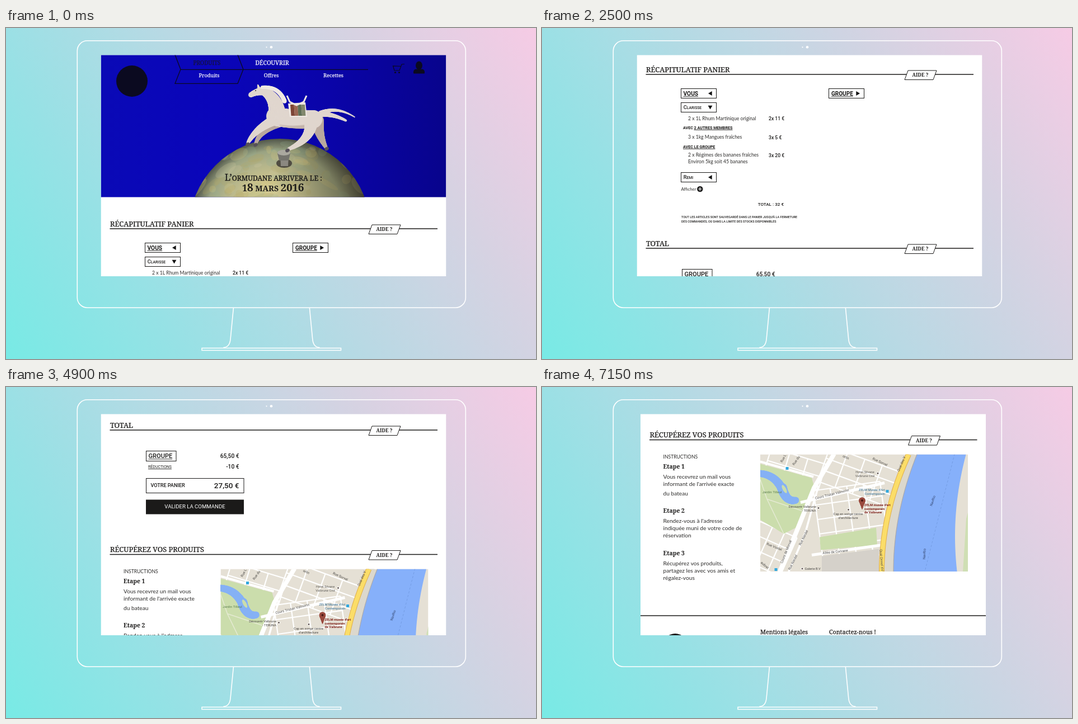
Recreate the animation shown at these times as an HTML page with a canvas. Size 947x592 px, loop 9150 ms.

```html
<!DOCTYPE html>
<html lang="fr">
<head>
<meta charset="utf-8">
<title>Panier</title>
<style>
html, body { margin: 0; width: 100%; height: 100%; overflow: hidden; }
canvas { display: block; width: 947px; height: 592px; }
</style>
</head>
<body>
<canvas id="stage"></canvas>
<script>
const W = 947, H = 592, LOOP = 9150, TICK = 50;
const canvas = document.getElementById('stage');
const ctx = canvas.getContext('2d');
const dpr = window.devicePixelRatio || 1;
canvas.width = W * dpr;
canvas.height = H * dpr;

const INK = '#1b1a19', NAVY = '#0b0a20';
const SERIF = '"Noto Serif", serif';
const LIGHT = 'Lato, sans-serif';
const LABEL = 'Roboto, sans-serif';
const LEFT = 169.5, WIDE = 617;

// Each scroll runs in equal hard steps.
const SCROLLS = [
  { start: 2000, steps: 11, dy: 276, dx: 0 },
  { start: 4500, steps: 9, dy: 317, dx: 0 },
  { start: 6900, steps: 6, dy: 205, dx: 6.5 }
];

function pose(t) {
  let x = 0, y = 0;
  for (const s of SCROLLS) {
    const n = Math.floor((t - s.start) / TICK) + 1;
    const part = Math.min(Math.max(n, 0), s.steps) / s.steps;
    x += s.dx * part;
    y += s.dy * part;
  }
  return { x, y: Math.round(y) };
}

function seeded(seed) {
  return () => (seed = (seed * 16807) % 2147483647) / 2147483647;
}

// Text is placed by the middle of its capitals.
function text(str, x, y, size, o = {}) {
  ctx.save();
  ctx.translate(x, y);
  ctx.rotate((o.turn || 0) * Math.PI / 180);
  ctx.font = `${o.weight || 400} ${size}px ${o.font || LABEL}`;
  ctx.textAlign = o.align || 'left';
  ctx.fillStyle = ctx.strokeStyle = o.color || INK;
  const base = size * 0.356;
  ctx.fillText(str, 0, base);
  if (o.thick) {
    ctx.lineWidth = o.thick;
    ctx.strokeText(str, 0, base);
  }
  if (o.under) ctx.fillRect(0, base + 1.2, ctx.measureText(str).width, 0.9);
  ctx.restore();
}

const serif = (s, x, y, size, o) => text(s, x, y, size, { font: SERIF, thick: 0.25, ...o });
const light = (s, x, y, size, o) => text(s, x, y, size, { font: LIGHT, color: '#2e2d2c', ...o });
const bold = (s, x, y, size, o) => text(s, x, y, size, { weight: 700, ...o });
const medium = (s, x, y, size, o) => text(s, x, y, size, { weight: 500, ...o });

// Runs of different sizes on one baseline.
function runs(parts, x, base, font, weight, thick = 0) {
  ctx.fillStyle = ctx.strokeStyle = INK;
  ctx.textAlign = 'left';
  ctx.lineWidth = thick;
  for (const [str, size] of parts) {
    ctx.font = `${weight} ${size}px ${font}`;
    ctx.fillText(str, x, base);
    if (thick) ctx.strokeText(str, x, base);
    x += ctx.measureText(str).width;
  }
}

function trace(p, closed) {
  ctx.beginPath();
  for (let i = 0; i < p.length; i += 2) ctx.lineTo(p[i], p[i + 1]);
  if (closed) ctx.closePath();
}

function poly(p, fill, stroke) {
  trace(p, true);
  ctx.fillStyle = fill;
  ctx.fill();
  if (!stroke) return;
  ctx.strokeStyle = stroke;
  ctx.lineWidth = 1;
  ctx.stroke();
}

function line(p, color, width = 1) {
  trace(p, false);
  ctx.strokeStyle = color;
  ctx.lineWidth = width;
  ctx.stroke();
}

function oval(x, y, rx, ry, fill, turn = 0) {
  ctx.beginPath();
  ctx.ellipse(x, y, rx, ry, turn, 0, Math.PI * 2);
  ctx.fillStyle = fill;
  ctx.fill();
}

const disc = (x, y, r, fill) => oval(x, y, r, r, fill);

// Tapered stroke along a quadratic curve.
function limb([x0, y0], [cx, cy], [x1, y1], r0, r1, fill) {
  for (let t = 0; t <= 1; t += 1 / 48) {
    const u = 1 - t, a = u * u, b = 2 * u * t, c = t * t;
    disc(a * x0 + b * cx + c * x1, a * y0 + b * cy + c * y1, r0 + (r1 - r0) * t, fill);
  }
}

function box(x, y, w, h, color = INK, width = 1) {
  ctx.strokeStyle = color;
  ctx.lineWidth = width;
  ctx.strokeRect(x, y, w, h);
}

function clipTo(x, y, w, h) {
  ctx.beginPath();
  ctx.rect(x, y, w, h);
  ctx.clip();
}

// Colour stops sit at even distances.
function blend(g, colors) {
  colors.forEach((c, i) => g.addColorStop(i / (colors.length - 1), c));
  return g;
}

function backdrop() {
  ctx.fillStyle = blend(ctx.createLinearGradient(0, H, W, 0),
    ['#78eae5', '#97e1e5', '#b9d9e4', '#d7d2e2', '#f6cbe5']);
  ctx.fillRect(0, 0, W, H);
}

function monitor() {
  ctx.strokeStyle = '#fff';
  ctx.lineWidth = 1.6;
  ctx.beginPath();
  ctx.roundRect(127.3, 22.8, 694, 477.4, 18);
  for (const side of [-1, 1]) {
    const at = dx => 474.4 + side * dx;
    ctx.moveTo(at(68), 501);
    ctx.lineTo(at(73.3), 556);
    ctx.quadraticCurveTo(at(74.5), 571, at(86), 571.5);
  }
  ctx.stroke();
  disc(465.5, 34.3, 1.1, '#fff');
  disc(474, 34.3, 2.3, '#fff');
  box(350, 572.5, 248.5, 4, '#fff', 1.5);
}

function globe() {
  const rnd = seeded(29), tints = ['#d9c77c', '#93ad94', '#cfc9a0', '#b0a662'];
  ctx.save();
  ctx.beginPath();
  ctx.arc(489, 360, 162, 0, Math.PI * 2);
  ctx.clip();
  ctx.fillStyle = blend(ctx.createRadialGradient(460, 300, 10, 489, 360, 164),
    ['#d0c88f', '#c6c08c', '#b3b48b', '#9aa382', '#4a4f45']);
  ctx.fillRect(320, 190, 340, 120);
  ctx.globalAlpha = 0.22;
  for (let i = 0; i < 90; i++) {
    const x = 345 + rnd() * 290, y = 205 + rnd() * 100;
    oval(x, y, 4 + rnd() * 18, 3 + rnd() * 7, tints[i % 4], (x - 489) / 160);
  }
  ctx.fillStyle = blend(ctx.createLinearGradient(480, 0, 650, 0), ['rgba(60,50,20,0)', '#332a18']);
  ctx.globalAlpha = 0.55;
  ctx.fillRect(480, 190, 170, 120);
  ctx.restore();
}

function knob() {
  oval(497, 242, 14, 8, '#504d42');
  poly([490, 228, 505, 228, 504, 247, 491, 247], '#8b8880');
  poly([485, 224, 508, 224, 505, 237, 488, 237], '#74736d');
  oval(496.5, 223, 11.5, 5, '#aaa89f');
}

function horse() {
  const coat = '#e0d6ce', shade = '#b9a89e', pale = '#efe8e2';
  limb([487, 170], [453, 184], [446, 207], 8, 2.6, shade);
  limb([556, 166], [559, 192], [572, 214], 12, 2.8, shade);
  limb([562, 152], [592, 139], [624, 160], 4, 1, coat);
  limb([562, 154], [586, 154], [608, 166], 5, 2, coat);
  limb([482, 158], [515, 165], [551, 163], 17, 16, coat);
  limb([490, 174], [520, 181], [550, 174], 2, 5, 'rgba(150,125,110,.08)');
  limb([545, 168], [545, 200], [504, 217], 12, 2.8, coat);
  limb([477, 166], [444, 182], [432, 206], 9, 2.8, coat);
  limb([484, 150], [482, 126], [463, 114], 15, 8, coat);
  limb([460, 113], [448, 113], [437, 120], 7.5, 4.3, coat);
  limb([452, 108], [451, 105], [450, 102], 2.2, 1, coat);
  limb([458, 106], [488, 104], [498, 132], 3, 4, pale);
  disc(446, 112, 1, '#3a3030');
  for (const [x, y] of [[432, 208], [446, 209], [503, 219], [573, 216]]) oval(x, y, 4, 3, '#565059', -0.5);
  poly([504, 135, 535, 133, 538, 159, 507, 159], pale);
  for (let i = 0; i < 4; i++) {
    const x = 508 + i * 6.5;
    poly([x, 137, x + 6.5, 137, x + 8, 157, x + 1.5, 157], ['#7d4536', '#9a6652', '#5f6f55', '#81876c'][i]);
  }
  line([502, 121, 507, 132, 519, 138, 532, 132, 537, 121], pale, 3);
}

function icons() {
  line([712, 64.5, 707, 65, 703, 76, 694, 76, 691.5, 68, 706, 68.5], NAVY, 1.2);
  disc(695.5, 79.5, 1.6, NAVY);
  disc(702.5, 79.5, 1.6, NAVY);
  oval(738, 67, 6, 7.5, NAVY);
  ctx.beginPath();
  ctx.roundRect(728, 73.5, 20, 8, [5, 5, 1, 1]);
  ctx.fill();
}

function hero() {
  ctx.save();
  clipTo(LEFT, 40, WIDE, 262.5);
  ctx.fillStyle = blend(ctx.createLinearGradient(170, 0, 787, 0), ['#0a09b6', '#0a05ba', '#0a04a8', '#08048c']);
  ctx.fillRect(LEFT, 40, WIDE, 263);
  globe();
  knob();
  horse();
  ctx.restore();
  disc(225, 95, 28, NAVY);
  line([302, 48, 312, 74, 302, 99.3, 414, 99.3, 424, 74, 414, 48], NAVY, 1.3);
  line([312, 74.3, 647, 74.3], NAVY, 1.3);
  icons();
  serif('PRODUITS', 359, 62, 9.9, { align: 'center', color: '#15133a' });
  serif('DÉCOUVRIR', 475.5, 62, 10.4, { align: 'center', color: '#fff' });
  ['Produits', 'Offres', 'Recettes'].forEach((s, i) =>
    serif(s, 363 + i * 111, 85, 9.2, { align: 'center', color: '#f4f2fa' }));
  runs([['L’', 16], ['ORMUDANE ARRIVERA LE :', 12.2]], 391, 273, SERIF, 400, 0.4);
  runs([['1', 16], ['8', 19], [' MARS ', 14], ['201', 18.5], ['6', 19]], 422, 292, SERIF, 700);
}

function section(title, y) {
  line([185.5, y, 771, y], INK, 1.5);
  serif(title, 186, y - 9, 12.8);
  poly([654, y - 7, 705, y - 7, 699, y + 9.5, 648, y + 9.5], '#fff', INK);
  serif('AIDE ?', 676, y + 1.2, 8.5, { align: 'center', weight: 700, thick: 0 });
}

const DOWN = 90, BACK = 180, NEXT = 0;

function chooser(x, y, turn) {
  box(x, y - 8.5, 63, 17);
  ctx.save();
  ctx.translate(x + 52, y);
  ctx.rotate(turn * Math.PI / 180);
  poly([3.5, 0, -3.2, -3.9, -3.2, 3.9], '#111');
  ctx.restore();
}

function member(name, y, turn) {
  chooser(248.5, y, turn);
  runs([[name[0], 9.2], [name.slice(1).toUpperCase(), 6.8]], 252.7, y + 3, LABEL, 500);
}

function item(name, price, y) {
  light(name, 261, y, 8.65);
  medium(price, 405, y + 0.6, 8.6);
}

function basket() {
  section('RÉCAPITULATIF PANIER', 359);
  chooser(248.5, 393, BACK);
  bold('VOUS', 252.5, 393, 10.2, { under: true });
  chooser(512.5, 393, NEXT);
  bold('GROUPE', 517, 393, 10, { under: true });
  member('Clarisse', 418, DOWN);
  item('2 x 1L Rhum Martinique original', '2x 11 €', 437.8);
  bold('AVEC', 252, 454, 7.2);
  bold('2 AUTRES MEMBRES', 271.5, 454, 7.2, { under: true });
  item('3 x 1kg Mangues fraîches', '3x 5 €', 471);
  bold('AVEC LE GROUPE', 252, 488, 7.2, { under: true });
  item('2 x Régimes des bananes fraîches', '3x 20 €', 503.3);
  item('Environ 5kg soit 45 bananes', '', 515.3);
  member('Remi', 543, BACK);
  light('Afficher', 248.5, 564.5, 7.8);
  disc(282.3, 564, 5.3, '#222');
  line([279.3, 564, 285.3, 564], '#fff', 1.2);
  line([282.3, 561, 282.3, 567], '#fff', 1.2);
  line([252, 581.5, 433, 581.5]);
  medium('TOTAL : 32 €', 432, 591, 8.1, { align: 'right' });
  medium("TOUT LES ARTICLES SONT SAUVEGARDÉ DANS LE PANIER JUSQU'À LA FERMETURE", 249, 614, 5.45);
  medium('DES COMMANDES, OÙ DANS LA LIMITE DES STOCKS DISPONNIBLES', 249, 622, 5.45);
}

function totals() {
  const end = { align: 'right' };
  section('TOTAL', 670);
  box(250.5, 707.5, 53.5, 18);
  medium('GROUPE', 254.5, 716.3, 11.1, { under: true });
  medium('65,50 €', 416.5, 716, 10.2, end);
  text('RÉDUCTIONS', 254, 735.5, 7, { under: true });
  medium('-10 €', 416.5, 735, 10.2, end);
  box(250.5, 756.5, 174.5, 26);
  medium('VOTRE PANIER', 258.5, 769, 9.1);
  medium('27,50 €', 416.5, 769, 13.5, end);
  ctx.fillStyle = INK;
  ctx.fillRect(250, 794.5, 175, 26);
  text('VALIDER LA COMMANDE', 337.5, 806.7, 9.6, { align: 'center', color: '#fff' });
}

// An empty line is a small paragraph gap.
const STEPS = [
  ['Vous recevrez un mail vous', "informant de l'arrivée exacte", '', 'du bateau'],
  ["Rendez-vous à l'adresse", 'indiquée muni de votre code de', 'réservation'],
  ['Récupérez vos produits,', 'partagez les avec vos amis et', 'régalez-vous']
];

function pickup() {
  section('RÉCUPÉREZ VOS PRODUITS', 892.5);
  light('INSTRUCTIONS', 210, 923, 8.6);
  let y = 940;
  STEPS.forEach((lines, i) => {
    serif('Etape ' + (i + 1), 210, y, 10.4, { weight: 700, thick: 0 });
    y += 18;
    for (const s of lines) {
      light(s, 210, y, 10.2);
      y += s ? 13 : 4;
    }
    y += 18.5;
  });
  ctx.save();
  ctx.translate(383.5, 918.5);
  map();
  ctx.restore();
}

const MAP_W = 371, MAP_H = 209.5;

// Samples a map edge given as x over the height above the bottom, 0 to 1.
function edge(fn) {
  const p = [];
  for (let u = -0.05; u <= 1.05; u += 0.05) p.push(fn(u), MAP_H * (1 - u));
  return p;
}

const quay = u => 217 + 48 * u * u;
const bank = u => 238 + 42 * u * u;
const farBank = u => 348 + 40 * (u - 0.3) ** 2;
const ferry = u => 294 + 53 * u;

function streets(x, y, turn, cols, rows, dx, dy) {
  ctx.save();
  ctx.translate(x, y);
  ctx.rotate(turn * Math.PI / 180);
  for (let i = 0; i <= cols; i++) line([i * dx, 0, i * dx, rows * dy], '#fff', 2.2);
  for (let j = 0; j <= rows; j++) line([0, j * dy, cols * dx, j * dy], '#fff', 2.2);
  ctx.restore();
}

function land() {
  ctx.fillStyle = '#e5e0d5';
  ctx.fillRect(0, 0, MAP_W, MAP_H);
  streets(95, 65, -8, 4, 6, 30, 26);
  streets(125, -14, 20, 4, 3, 33, 22);
  streets(0, 120, 24, 3, 4, 24, 25);
  streets(20, -12, 17, 3, 2, 34, 24);
  poly([0, 17, 92, 42, 96, 57, 66, 130, 42, 142, 0, 117], '#cbddac');
  poly([106, 148, 207, 131, 209, 162, 108, 171], '#cbddac');
  poly([110, 182, 212, 169, 213, 212, 110, 212], '#d5d1ca');
  line([0, 45, 12, 80, 42, 142], '#e5ead3', 1.5);
  line([12, 80, 78, 102], '#e5ead3', 1.5);
  limb([-2, 34], [26, 36], [39, 62], 6, 8, '#85b1f5');
  limb([39, 60], [46, 86], [64, 82], 9, 6, '#85b1f5');
  oval(43, 62, 3, 8, '#cbddac', -0.5);
  line([0, 13, 95, 40], '#fff', 4);
  line([72, 86, 222, 51], '#fff', 5);
  line([92, 180, 218, 162], '#fff', 5);
  line([132, -1, 96, 60, 66, 135, 34, 212], '#fff', 8);
  line([104, 56, 80, 142, 50, 212], '#fff', 3.5);
}

function river() {
  const shore = edge(bank);
  const right = edge(farBank);
  const water = [...shore];
  for (let i = right.length - 2; i >= 0; i -= 2) water.push(right[i], right[i + 1]);
  line(edge(u => (quay(u) + bank(u)) / 2 + 2), '#dcd8cd', 19);
  poly(water, '#86b0fa');
  poly([368, 115, 372, 100, 372, 210, 362, 210], '#cfdfb4');
  line(shore, '#a9a9ad', 1.2);
  ctx.setLineDash([4, 3]);
  line(edge(ferry), '#7099df', 0.8);
  ctx.setLineDash([]);
  line(edge(quay), '#dfae4c', 10);
  line(edge(quay), '#fbdd68', 8);
}

function label(str, x, y, turn = 0, color = '#4c4a47') {
  text(str, x, y, 6.1, { align: 'center', turn, color });
}

function place(lines, x, y, align, color = '#454340', weight = 400) {
  lines.forEach((s, i) => text(s, x, y + i * 6.6, 5.8, { align, color, weight }));
}

function labels() {
  label('Rue Sorval', 214, 13, 25);
  label('Cours Tristan Valmorin', 128, 71, -14);
  label('Rue Vostel', 25, 165, 22);
  label('Cours de Morval', 46, 174, -68);
  label('Rue Nardel', 77, 149, -64);
  label('Rue Nardel', 58, 193, -64);
  label('Allée de Corvane', 134, 174, -6);
  label('aubrel', 8, 198, 42);
  label('Rue L', 41, 7, -62);
  label('Rue du', 64, 11, -56);
  label('orlin', 153, 5, 25);
  label('Quai des V', 252, 17, -66);
  label('Quai Ormel XVI', 217, 190, 86);
  label('NavRio', 308, 83, -72, '#34466e');
  label('NavRio', 293, 178, -87, '#34466e');
  label('Jardin Tilleul', 21, 67.5, 0, '#5b7f4d');
  place(['Hotel Silvane', 'Valbrune Cité'], 187, 31.5, 'center', '#5d5a56');
  place(["ZELM Musée d'Art", 'Contemporain'], 223, 63.5, 'right', '#2d6a92');
  place(['Découvrir Valbrune', '- TERUNA'], 99.5, 93.5, 'right');
  place(['Cap en songe centre', "d'architecture"], 157, 106.5, 'center');
  place(['Galerie B.V'], 79.5, 204.5, 'left');
  place(["ZELM musée d'art", 'contemporain', 'de Valbrune'], 186, 90.5, 'left', '#7d2018', 700);
}

function marks() {
  ctx.fillStyle = '#32a8de';
  for (const [x, y] of [[227, 66], [48, 25], [28, 206]]) ctx.fillRect(x - 2.5, y - 2.5, 5, 5);
  for (const [x, y] of [[104, 96], [157.5, 99], [210, 34], [75, 204.5]]) {
    disc(x, y, 2.4, '#fff');
    disc(x, y, 1.4, '#5c504c');
  }
  limb([182, 82.5], [182, 88], [182, 98], 5.8, 0.5, '#9a4a3e');
  disc(182, 82.5, 2, '#4a1712');
}

function map() {
  clipTo(0, 0, MAP_W, MAP_H);
  land();
  river();
  labels();
  marks();
}

function footer() {
  line([LEFT, 1207, LEFT + WIDE, 1207], INK, 1.5);
  disc(231.5, 1261, 22, INK);
  serif('Mentions légales', 383.5, 1236.5, 10.7);
  serif('Contactez-nous !', 506.5, 1236.5, 10.7);
}

function screen(t) {
  const { x, y } = pose(t);
  ctx.save();
  ctx.translate(x, 0);
  clipTo(LEFT, 48.5, WIDE, 395.5);
  ctx.fillStyle = '#fff';
  ctx.fillRect(LEFT, 48, WIDE, 397);
  ctx.translate(0, -y);
  hero();
  basket();
  totals();
  pickup();
  footer();
  ctx.restore();
}

function draw(now) {
  ctx.setTransform(dpr, 0, 0, dpr, 0, 0);
  backdrop();
  monitor();
  screen(Math.max(0, now - origin) % LOOP);
  requestAnimationFrame(draw);
}

const origin = performance.now();
draw(origin);
</script>
</body>
</html>
```
